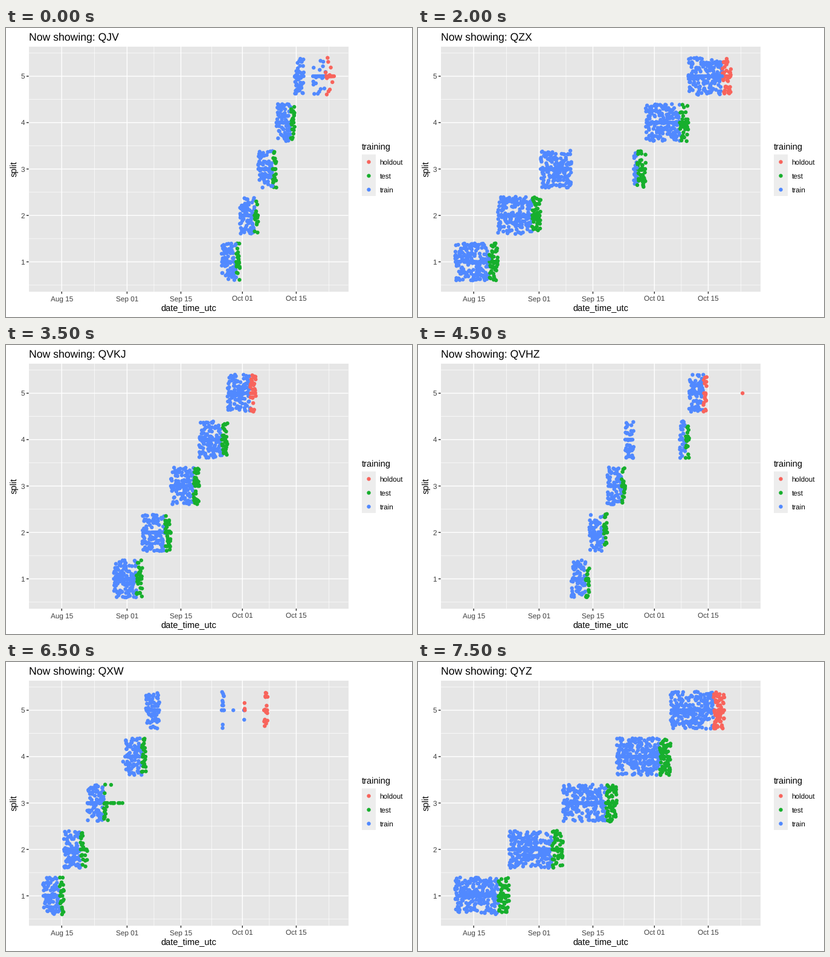
These frames come from a looping animation (672 px wide and 480 px high, 8000 ms). A matplotlib script:

```python
import numpy as np
import matplotlib.pyplot as plt
from matplotlib.animation import FuncAnimation
from matplotlib.patches import Rectangle

W, H, DPI = 672, 480, 96
PX = 72 / DPI              # points per pixel
DAY = 6.364                # pixels per day on the date axis
LEFT, RIGHT, TOP, BOTTOM = 37.6, 566.6, 30.8, 437.8
COLORS = {"holdout": "#F8645C", "test": "#17AF2D", "train": "#5189FF"}

TITLES = ["QJV", "QZWY", "QZX", "QVKJ", "QVHZ", "QWJ", "QXW", "QYZ"]

OUTAGE = (254, 357, 0)
# Each series: first x, last x, lulls as (from, to, share of hours kept).
SERIES = [
    (357, 543, [(493, 508, 0), (508, 543, 0.4)]),
    (61.5, 543, [(84, 92, 0.3), OUTAGE]),
    (61.5, 518, [OUTAGE]),
    (357.5, 543, []),
    (178.5, 413.5, []),
    (254, 537.2, [(357, 433, 0), (478, 537, 0)]),
    (61.5, 357, [(72, 100, 0), (230, 236, 0), (252, 263, 0),
                 (263.5, 300, 0), (306, 315, 0), (333, 338, 0)]),
    (61.5, 433, [(128, 134, 0.2), (165, 198, 0.2), OUTAGE,
                 (361, 376, 0), (376.5, 394, 0), (395.5, 427, 0)]),
    (61.5, 507, []),
]


def split_y(split):
    return 465.5 - 77.08 * split


def build(series, seed):
    """Five equal splits of hourly points, the last fifth of each held back."""
    start, end, lulls = series
    rng = np.random.default_rng(seed)
    x = np.arange(start, end, DAY / 24)
    kept = np.ones(x.size)
    for a, b, share in lulls:
        kept[(x > a) & (x < b)] = share
    x = x[rng.random(x.size) < kept]
    points, colors = [], []
    for split, part in enumerate(np.array_split(x, 5), 1):
        n = part.size
        jitter = rng.uniform(-0.4, 0.4, n)
        jitter[rng.random(n) < 0.2] = 0
        jitter[1:][np.diff(part) > 1] = 0
        points.append(np.column_stack([part, split_y(split + jitter)]))
        train = round(0.8 * n)
        late = "holdout" if split == 5 else "test"
        colors += [COLORS["train"]] * train + [COLORS[late]] * (n - train)
    return np.vstack(points), np.array(colors)


def lift(points, colors):
    """Bring a few train points next to a test part to the front."""
    train = colors == COLORS["train"]
    last = np.flatnonzero(train[:-1] & ~train[1:])[::2] - 2
    order = np.r_[np.delete(np.arange(len(colors)), last), last]
    return points[order], colors[order]


def label(x, y, s, size, **kw):
    return ax.text(x, y, s, fontsize=size, **{"va": "baseline", **kw})


def box(x, y, w, h, color):
    ax.add_patch(Rectangle((x, y), w, h, fc=color, lw=0, zorder=0))


plt.rcParams["font.family"] = "Liberation Sans"
plt.rcParams["text.hinting"] = "none"
fig = plt.figure(figsize=(W / DPI, H / DPI), dpi=DPI, facecolor="white")
ax = fig.add_axes([0, 0, 1, 1])
ax.set(xlim=(0, W), ylim=(H, 0))
ax.axis("off")

# Panel, grid and axes
box(LEFT, TOP, RIGHT - LEFT, BOTTOM - TOP, "#E6E6E6")
dates = {"Aug 15": 0, "Sep 01": 17, "Sep 15": 31, "Oct 01": 47, "Oct 15": 61}
major_x = 92.2 + DAY * np.array(list(dates.values()))
minor_x = np.r_[(major_x[1:] + major_x[:-1]) / 2, major_x[-1] + 8.5 * DAY]
major_y = split_y(np.arange(1, 6))
minor_y = split_y(np.arange(0.5, 6))
for xs, ys, lw in ((minor_x, minor_y, 0.71), (major_x, major_y, 1.42)):
    grid = dict(color="white", lw=lw * PX, zorder=1, snap=False)
    ax.vlines(xs, TOP, BOTTOM, **grid)
    ax.hlines(ys, LEFT, RIGHT, **grid)
ticks = dict(color="#2B2B2B", lw=1.42 * PX, snap=False)
ax.vlines(major_x, BOTTOM, BOTTOM + 3.7, **ticks)
ax.hlines(major_y, LEFT - 3.7, LEFT, **ticks)
for name, x in zip(dates, major_x):
    label(x, 453.3, name, 8.8, ha="center", color="#404040")
for split, y in enumerate(major_y, 1):
    label(31, y + 4.2, str(split), 8.8, ha="right", color="#404040")
label(302, 470, "date_time_utc", 11, ha="center")
label(21, 234.3, "split", 11, ha="right", va="center", rotation=90)

# Legend
dot = dict(s=(6.4 * PX) ** 2, linewidths=0, zorder=3, snap=False)
label(588.3, 202.3, "training", 11)
box(588.6, 210.3, 23.04, 69.1, "#EDEDED")
for k, (name, color) in enumerate(COLORS.items()):
    y = 221.9 + 23.04 * k
    ax.scatter([600.1], [y], c=color, **dot)
    label(618.6, y + 4.5, name, 8.8)

clouds = [build(series, seed) for seed, series in enumerate(SERIES)]
title = label(37.6, 20, "", 13.2)
cloud = ax.scatter([], [], **dot)


def update(i):
    # The points switch half a step before the title does.
    points, colors = clouds[(i + 1) // 2]
    if i % 2 == 0:
        points, colors = lift(points, colors)
    cloud.set_offsets(points)
    cloud.set_facecolor(colors)
    title.set_text("Now showing: " + TITLES[i // 2])
    return cloud, title


anim = FuncAnimation(fig, update, frames=16, interval=500,
                     repeat=True, repeat_delay=0)
plt.show()
```
